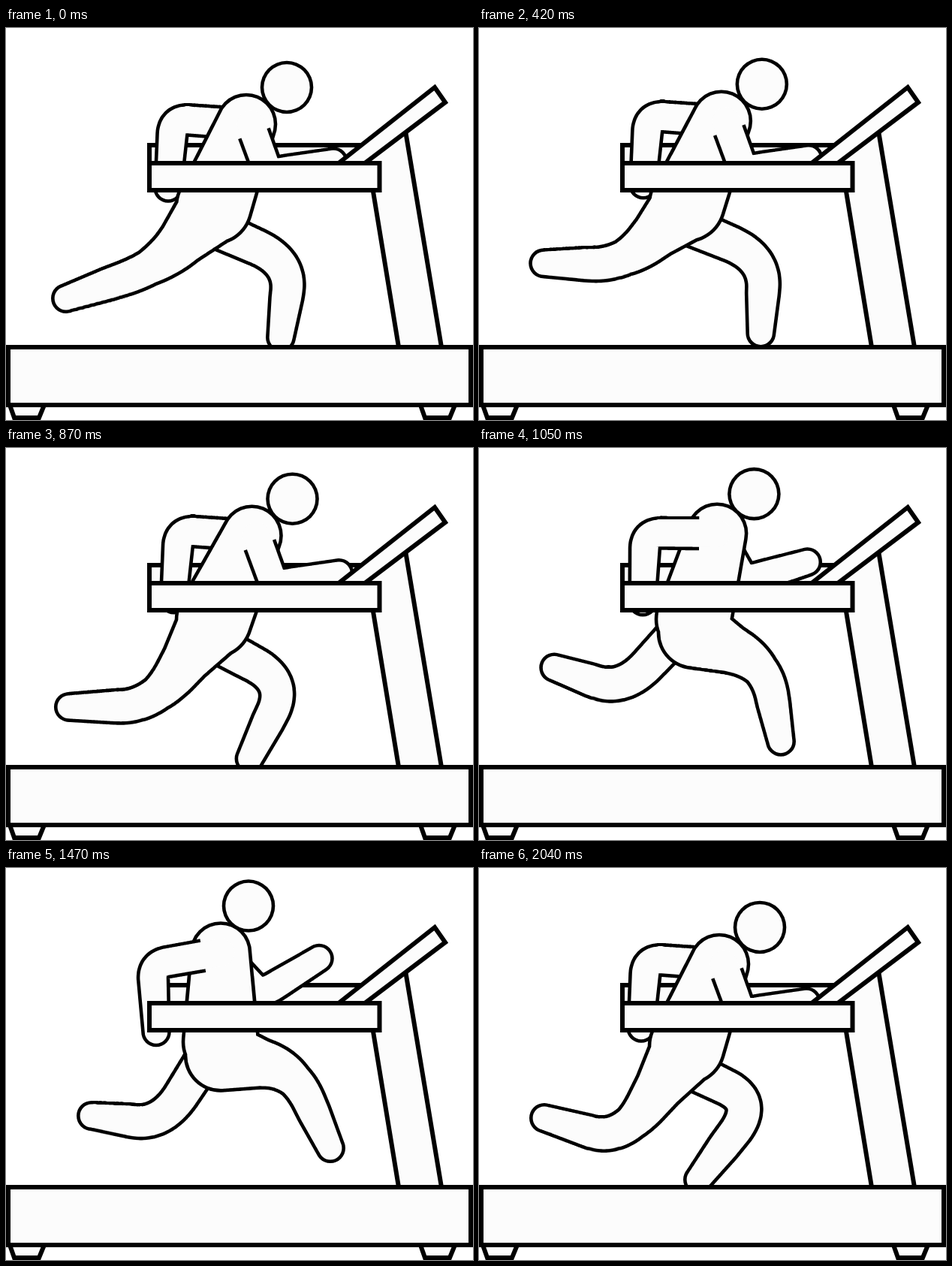
These frames come from a looping animation (622 by 522 pixels, 2070 ms). An HTML page with a canvas:

```html
<!DOCTYPE html>
<html lang="en">
<head>
<meta charset="utf-8">
<title>Treadmill runner</title>
<style>
  html, body { margin: 0; width: 100%; height: 100%; overflow: hidden; background: #fff; }
  canvas { display: block; width: 622px; height: 522px; }
</style>
</head>
<body>
<canvas id="stage" width="622" height="522"></canvas>
<script>
const ctx = document.getElementById('stage').getContext('2d');
const FILL = '#fcfcfc', INK = '#000', LINE = 4.6;
const LOOP = 2070, STEP = 30;

const mix = (a, b, t) => a + (b - a) * t;
const mixAll = (a, b, t) => a.map((v, i) => mix(v, b[i], t));
const clamp = v => Math.max(0, Math.min(1, v));
const ramp = (x, from, to) => {
  const t = clamp((x - from) / (to - from));
  return t * t * (3 - 2 * t);
};

// Linear interpolation of rows [x, ...values].
function along(rows, x) {
  let i = 1;
  while (i < rows.length - 1 && rows[i][0] < x) i++;
  const a = rows[i - 1], b = rows[i];
  return mixAll(a, b, clamp((x - a[0]) / (b[0] - a[0]))).slice(1);
}

// Time in ms against strides taken: even, then slower, then a sprint.
const pace = [[0, .25], [630, 3.18], [870, 4.39], [1230, 5.75], [1470, 6.92], [2040, 10.5]];

// One leg over two strides, touching down near 0: phase, knee, foot.
const gait = [
  [-.25, 390, 264, 355, 391],
  [-.08, 384, 269, 432, 373],
  [.25, 380, 312, 366, 412],
  [.5, 371, 312, 292, 415],
  [.75, 203, 338, 114, 398],
  [.92, 208, 342, 114, 330],
  [1.16, 182, 313, 92, 270],
  [1.25, 203, 318, 80, 360],
  [1.5, 190, 364, 87, 333],
  [1.75, 390, 264, 355, 391]
];

const wrap = u => ((u + .25) % 2 + 2) % 2 - .25;

// 1 while the leg trails, 0 while it leads; the arm does the opposite.
const trail = u => ramp(u, .5, .75) - ramp(u, 1.5, 1.75);

// Discs along a line with a rounded corner; the radius follows a profile.
function limb(a, k, b, corner, radii) {
  const p = mixAll(k, a, corner), q = mixAll(k, b, corner);
  const pts = [];
  const run = (n, at) => { for (let i = 0; i < n; i++) pts.push(at(i / n)); };
  run(70, t => mixAll(a, p, t));
  run(90, t => mixAll(mixAll(p, k, t), mixAll(k, q, t), t));
  run(70, t => mixAll(q, b, t));
  pts.push(b);
  let len = 0;
  const dist = pts.map((pt, i) =>
    len += i ? Math.hypot(pt[0] - pts[i - 1][0], pt[1] - pts[i - 1][1]) : 0);
  return pts.map(([x, y], i) => ({ x, y, r: along(radii, dist[i] / len)[0] }));
}

function stamp(discs, grow, color) {
  ctx.fillStyle = color;
  ctx.beginPath();
  for (const { x, y, r } of discs) {
    ctx.moveTo(x + r + grow, y);
    ctx.arc(x, y, r + grow, 0, 7);
  }
  ctx.fill();
}

// "open" leaves the first pixels of the limb without an outline.
function body(discs, open = 0) {
  ctx.save();
  if (open) {
    const [a, b] = discs;
    ctx.translate(a.x, a.y);
    ctx.rotate(Math.atan2(b.y - a.y, b.x - a.x));
    ctx.beginPath();
    ctx.rect(open, -400, 800, 800);
    ctx.clip();
    ctx.rotate(-Math.atan2(b.y - a.y, b.x - a.x));
    ctx.translate(-a.x, -a.y);
  }
  stamp(discs, LINE / 2, INK);
  ctx.restore();
  stamp(discs, -LINE / 2, FILL);
}

function shape(points, width = 6) {
  ctx.beginPath();
  points.forEach(([x, y]) => ctx.lineTo(x, y));
  ctx.closePath();
  ctx.fillStyle = FILL;
  ctx.fill();
  ctx.lineWidth = width;
  ctx.strokeStyle = INK;
  ctx.stroke();
}
const box = (l, t, r, b) => shape([[l, t], [r, t], [r, b], [l, b]]);

const torsoRadii = [[0, 39], [1, 50]];
const nearLeg = [[0, 47], [.25, 33], [.5, 24], [.75, 22], [1, 17.7]];
const farLeg = [[0, 26], [.5, 23.5], [.75, 22], [1, 17.7]];
const armRadii = [[0, 20.5], [.6, 20], [1, 17.5]];

function runner(strides, t) {
  const beat = wrap(strides) % 1;
  const s = beat > .75 ? beat - 1 : beat;
  const crouch = ramp(s, -.08, .15) * (1 - ramp(s, .52, .74));
  const sway = (1 - Math.cos(2 * Math.PI * t / LOOP)) / 2;

  // A point of the upper body, from flight to crouch.
  const upper = (flight, low) => {
    const [x, y] = mixAll(flight, low, crouch);
    return [x + 8 * sway, y - 12 * sway];
  };

  const nearU = wrap(strides - 1), farU = wrap(strides);
  const back = trail(nearU);
  const chest = upper([281, 120], [320, 128]);
  const hips = [286 - 9 * back, 237 - 9 * sway];

  const leg = (u, hip, radii) => {
    const [kx, ky, fx, fy] = along(gait, u);
    return limb(hip, [kx, ky], [fx, fy], .4, radii);
  };
  const arm = (shoulder, forward) => {
    const elbow = mixAll(upper([190, 136], [223, 121]), upper([334, 176], [350, 194]), forward);
    const hand = mixAll(upper([195, 226], [216, 213]), upper([412, 128], [436, 178]), forward);
    return limb(shoulder, elbow, hand, .22, armRadii);
  };

  body(arm(chest, 1 - back));
  body(leg(farU, [hips[0] - 12, hips[1] + 8 + 16 * back], farLeg));
  body([
    ...limb(chest, mixAll(chest, hips, .5), hips, .5, torsoRadii),
    ...leg(nearU, [hips[0], hips[1] + 18 - 16 * back], nearLeg)
  ]);
  body(arm([chest[0] + 6 * back, chest[1]], back), 24 - 11 * back);

  const [nx, ny] = mixAll([37, -62], [54, -49], crouch);
  body([{ x: chest[0] + nx, y: chest[1] + ny, r: 33 }]);
}

function machine() {
  shape([[482, 175], [523, 425], [580, 425], [532, 137]]);
  shape([[571, 79], [585, 99], [478, 180], [443, 180]]);
  box(191, 180, 497.5, 216);
  for (const x of [5, 552]) shape([[x, 502], [x + 6, 519], [x + 39, 519], [x + 46, 502]]);
  box(3, 425, 619, 502);
}

function draw(time) {
  const t = Math.floor(time % LOOP / STEP) * STEP;
  ctx.fillStyle = '#fff';
  ctx.fillRect(0, 0, 622, 522);
  box(191, 156, 472, 190);
  runner(along(pace, t)[0], t);
  machine();
}

const start = performance.now();
function tick() {
  draw(performance.now() - start);
  requestAnimationFrame(tick);
}
tick();
</script>
</body>
</html>
```
